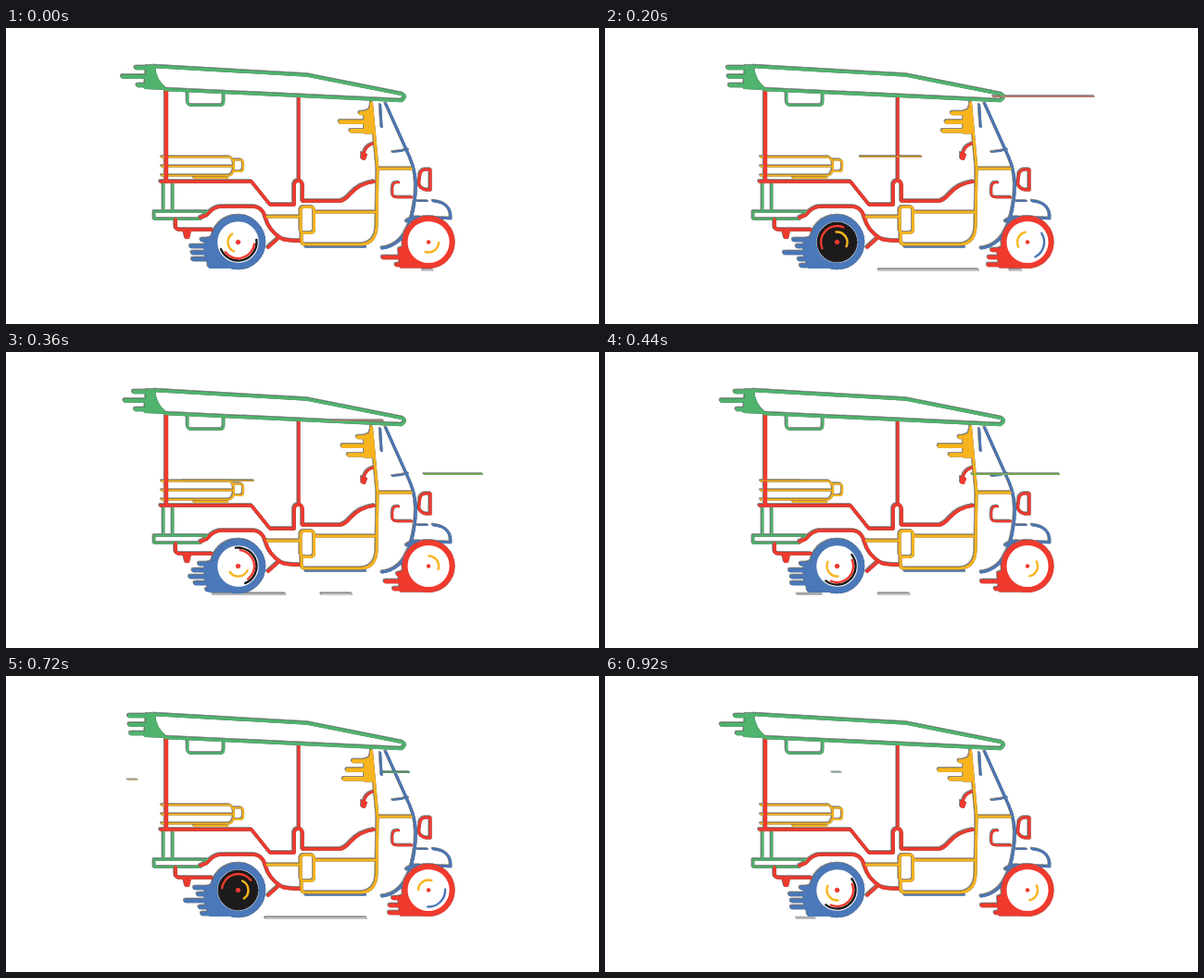
Write an HTML page that moves like this. It is 640 px wide and 320 px high and loops after 0.96 s.

```html
<!DOCTYPE html>
<html lang="en">
<head>
<meta charset="utf-8">
<title>Speeding tuk-tuk</title>
<style>
  html, body { margin: 0; width: 100%; height: 100%; overflow: hidden; background: #fff; }
  svg { display: block; width: 100vw; height: 100vh; }
  #art { filter: drop-shadow(.5px .6px 0 rgba(20, 20, 20, .75)) drop-shadow(-.3px -.4px 0 rgba(20, 20, 20, .5)); }
  path, line, circle, rect { fill: none; stroke: currentColor; stroke-linecap: round; stroke-linejoin: round; }
  .g { color: #50b36e; }
  .r { color: #f03a2e; }
  .b { color: #4b78b8; }
  .y { color: #f8b41e; }
  .k { color: #1c1a1b; }
  .fill { fill: currentColor; }
  .hub { fill: #fff; }
</style>
</head>
<body>
<svg viewBox="0 0 640 320">
  <g id="art">
    <g id="ground" stroke-width="2.400"></g>

    <!-- chassis and rack -->
    <path class="g" d="M170 167V198M180 167V198M160 198.500H217L210 206.500H160Z" stroke-width="2.600"/>
    <g class="y" stroke-width="2.200">
      <path d="M168 139.500H241Q246 141 246 149Q246 158 241 159.500H168M168 149.500H244M203 162H239"/>
      <path d="M246 142.500H253Q256 143 256 146V151Q256 155 253 155H246"/>
    </g>

    <!-- red frame and seats -->
    <g class="r">
      <path d="M173 67V165" stroke-width="4.200" style="stroke-linecap:butt"/>
      <path d="M316 75V165" stroke-width="3"/>
      <g stroke-width="3.600">
        <path d="M167 166H265L285 191H311V171Q311 165 315.500 165Q320 165 320 171V187H361Q366 186 372 179Q382 168 397 166"/>
        <path d="M183 207V214Q183 218 188 218H222M210 205L217 202Q224 193 233 193H266Q277 193 280 205Q284 220 298 228Q303 230 317 230M283 237L293 228"/>
      </g>
      <path class="fill" d="M192 219H199L197 227H194Z" stroke-width="2"/>
      <path d="M396 125Q387 128 386 137" stroke-width="2.800"/>
      <path class="fill" d="M384 135L389 137L387 142L384 141Z" stroke-width="2"/>
    </g>

    <!-- amber cab -->
    <path class="b" d="M323 236.500H388" stroke-width="2"/>
    <g class="y" stroke-width="3">
      <path d="M319 222V230Q319 234 323 234H383Q400 233 400 213L401 152L394.500 81M401 152H439"/>
      <path d="M282 204H317M333 199H398"/>
      <rect x="318" y="193.500" width="14.500" height="28" rx="3.500"/>
      <path class="fill" d="M387 90L392 88L394 82L397 114H387Z" stroke-width="1"/>
    </g>

    <!-- windscreen and nose -->
    <g class="b">
      <path d="M410 82L436 140Q444 158 442 180Q438 218 424 230Q416 237 406 238" stroke-width="2.800"/>
      <path d="M404 83L405.500 107" stroke-width="2.200"/>
      <path d="M417 134Q426 134 434 131M444 187H455" stroke-width="1.600"/>
      <path d="M432 209Q438 204 448 205L480 206Q481 189 461 187" stroke-width="2.600"/>
    </g>
    <g class="r" stroke-width="3">
      <path d="M447 157Q449 153 453 153H458V175H453Q444 173 446 164Z"/>
      <path d="M424 167Q417 166 417 173V179Q417 183 422 183H438" stroke-width="2.400"/>
    </g>

    <!-- roof -->
    <g class="g">
      <path class="fill" d="M152 41H160Q161 57 173 66L150 65Z" stroke-width="2"/>
      <path d="M160 41.500L325 51L428 71.500Q433 74 427 78.500L172 66.500" stroke-width="3.400"/>
      <path d="M196 70V79Q196 83.500 200 83.500H231Q235 83.500 235 79V71" stroke-width="2.600"/>
    </g>

    <!-- wheels -->
    <path class="b fill" d="M225 225Q221 245 246 259H220L215 244V229Z" stroke-width="2"/>
    <path class="r fill" d="M431 236Q436 256 455 258.500H426L424 239Z" stroke-width="2"/>
    <g id="fingers" stroke-width="4.600"></g>
    <circle class="b hub" cx="250.500" cy="231.500" r="26" stroke-width="7.500"/>
    <circle class="r hub" cx="456" cy="231.500" r="25.500" stroke-width="6"/>
    <circle id="tyre" class="k fill" cx="250.500" cy="231.500" r="21.500"/>
    <g id="arcs" stroke-width="2.400"></g>
    <circle class="r fill" cx="250.500" cy="231.500" r="2.200"/>
    <circle class="r fill" cx="456" cy="231.500" r="1.800"/>
    <g id="wind" stroke-width="1.300"></g>
  </g>
</svg>
<script>
const LOOP = 960, STEP = 40, TURNS = 2;
const $ = id => document.getElementById(id);

function add(parent, tag, attrs) {
  const el = document.createElementNS('http://www.w3.org/2000/svg', tag);
  for (const k in attrs) el.setAttribute(k, attrs[k]);
  return $(parent).appendChild(el);
}
const show = (el, on) => el.setAttribute('visibility', on ? 'visible' : 'hidden');

// Trailing fingers: evenly spaced rows, neighbours swing in opposite directions
const fingers = [];
function fringe(cls, base, top, gap, tips) {
  tips.forEach((x, i) => {
    const y = top + i * gap;
    const el = add('fingers', 'line', { class: cls, x2: base, y1: y, y2: y });
    fingers.push({ el, x, swing: i % 2 ? 4 : -4 });
  });
}
fringe('g', 156, 43, 9.5, [137, 130, 139]);
fringe('y', 390, 92, 9.6, [379, 365, 369]);
fringe('b', 224, 229, 7, [208, 204, 198, 206, 216]);
fringe('r', 432, 240, 8, [422, 411, 418]);

// Arcs turning at constant speed inside the wheels
const arcs = [];
function arc(cls, cx, r, sweep, start) {
  const a = sweep * Math.PI / 360;
  const x = r * Math.cos(a), y = r * Math.sin(a);
  const el = add('arcs', 'path', { class: cls, d: `M${x} ${-y}A${r} ${r} 0 0 1 ${x} ${y}` });
  arcs.push({ el, cx, start });
  return el;
}
arc('k', 250.5, 20, 165, 75);
arc('r', 250.5, 17.5, 135, 75);
arc('y', 250.5, 11, 120, 175);
arc('y', 456, 11, 105, 55);
const glint = arc('b', 456, 18, 95, 225);

// Streaks: the head eases out and the tail eases in
const streaks = [];
function streak(layer, color, y, from, to, start, end, power) {
  const el = add(layer, 'line', { style: `color:${color}`, y1: y, y2: y });
  streaks.push({ el, from, to, start, end, power });
}
const road = (...timing) => streak('ground', '#c6c6cc', 261.8, 460, 206, ...timing);
road(-10, 470, 1.8);
road(165, 640, 1.2);
road(505, 940, 1.8);
streak('wind', '#c98572', 74, 540, 350, 100, 400, 2.5);
streak('wind', '#d5a230', 139, 360, 163, 90, 500, 1.8);
streak('wind', '#d8a93c', 112, 360, 120, 480, 740, 1.2);
streak('wind', '#7fc24f', 132, 522, 325, 280, 680, 2);
streak('wind', '#55a56b', 104, 494, 235, 630, 940, 1.2);

function drawStreak(s, t) {
  const u = (t - s.start) / (s.end - s.start);
  show(s.el, u > 0 && u < 1);
  if (u <= 0 || u >= 1) return;
  const x = k => s.from + (s.to - s.from) * k;
  s.el.setAttribute('x1', x(1 - (1 - u) ** s.power));
  s.el.setAttribute('x2', x(u ** s.power));
  s.el.setAttribute('opacity', 1 - u ** 8);
}

function draw(t) {
  const turn = TURNS * t / LOOP;
  const pulse = Math.cos(2 * Math.PI * (turn - 0.45));
  for (const f of fingers) f.el.setAttribute('x1', f.x + f.swing * pulse);
  for (const a of arcs)
    a.el.setAttribute('transform', `translate(${a.cx} 231.5) rotate(${a.start + 360 * turn})`);
  for (const s of streaks) drawStreak(s, t);
  show($('tyre'), pulse > 0.6);
  show(glint, pulse > 0.2);
}

function tick() {
  draw(Math.floor(performance.now() % LOOP / STEP) * STEP);
  requestAnimationFrame(tick);
}
tick();
</script>
</body>
</html>
```
